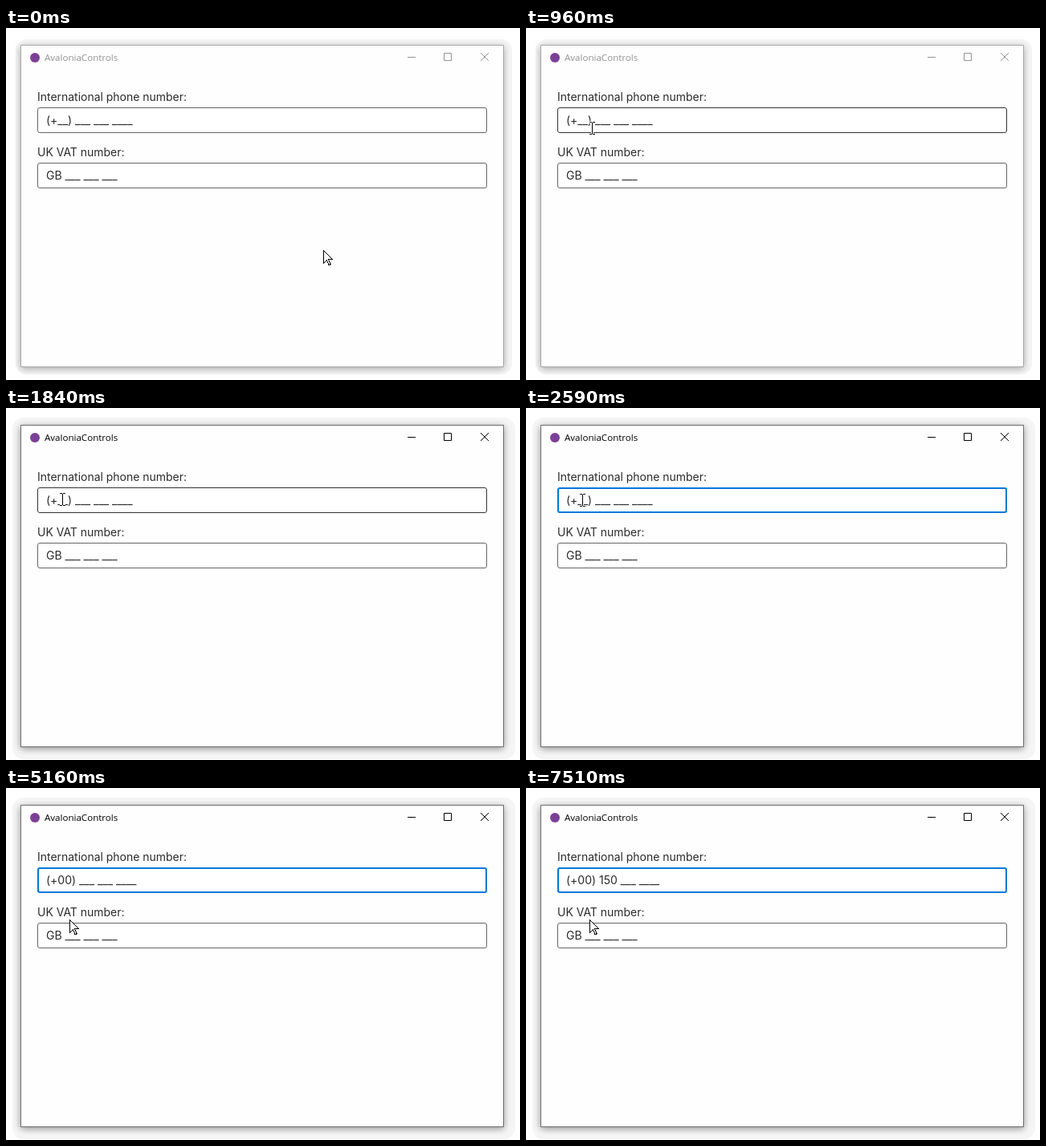
Animation, 640 px wide and 439 px high, one loop 8 s. Source, as an HTML page:

```html
<!DOCTYPE html>
<html lang="en">
<head>
<meta charset="utf-8">
<title>Masked input</title>
<style>
  html, body { margin: 0; width: 100%; height: 100%; overflow: hidden; background: #fff; }
  svg { display: block; }
  text { font: 14px Inter, sans-serif; letter-spacing: -.02px; fill: #2b2b2b; white-space: pre; }
  .title { font: 11.6px "Open Sans", sans-serif; }
  .line { fill: none; }
</style>
</head>
<body>
<svg width="640" height="439" viewBox="0 0 640 439">
  <defs>
    <filter id="blur" x="-10%" y="-10%" width="120%" height="120%">
      <feGaussianBlur stdDeviation="4.5"/>
    </filter>
  </defs>

  <rect id="halo" rx="14" fill="#f5f5f5"/>
  <rect id="shadow" x="18" y="23" width="602" height="402" rx="3" filter="url(#blur)"/>
  <rect id="frame" x="18.5" y="21.5" width="601" height="401" fill="#fefefe"/>

  <circle cx="36" cy="37" r="6" fill="#7b3f98"/>
  <text id="title" class="title" x="48" y="41">AvaloniaControls</text>
  <path id="buttons" class="line" d="M500 36.5h10M545.5 31.5h9v9h-9zM591 31l10 10M601 31l-10 10"/>

  <text x="39" y="91">International phone number:</text>
  <rect id="phoneBox" fill="#fff"/>
  <text id="phone" x="50" y="120"></text>
  <rect id="caret" y="106" width="1" height="17"/>

  <text x="39" y="160">UK VAT number:</text>
  <rect id="vatBox" fill="#fff"/>
  <text x="50" y="189">GB ___ ___ ___</text>

  <path id="arrow" fill="#fff" stroke="#000" shape-rendering="crispEdges"
    d="M.5 .5V16.5L4.5 12.5 7 18.5H8.5L9 17.5 6.5 11.5H11.5Z"/>
  <g id="beam" class="line">
    <path d="M-3 -7.5H4M.5 -7.5V7.5M-3 7.5H4" stroke="#fff" stroke-width="3"/>
    <path d="M-3 -7.5H0M1 -7.5H4M.5 -7V7M-3 7.5H0M1 7.5H4" stroke="#000"/>
  </g>
</svg>
<script>
const LOOP = 8000, STEP = 57.5, MOVE = 440, ACTIVATE = 1840, FOCUS = 1900;
const BLINK = 500, BLINK_START = 1600;
const PHONE_Y = 99, VAT_Y = 168, TEXT_X = 50;
const mask = "(+__) ___ ___ ____", digits = "00150";
const keyTimes = [4210, 4640, 6300, 6450, 7010];

// Pointer waypoints: approach, enter the field, settle, wait, leave
const path = [
  { t: 382, x: 395, y: 277 }, { t: 670, x: 160, y: 207 },
  { t: 957, x: 82, y: 125 }, { t: 1475, x: 70, y: 114 },
  { t: 2560, x: 70, y: 114 }, { t: 2990, x: 79, y: 164 }
];

const $ = id => document.getElementById(id);
const set = (id, attrs) => {
  for (const k in attrs) $(id).setAttribute(k, attrs[k]);
};
const show = (id, on) => set(id, { visibility: on ? "visible" : "hidden" });

// The pointer is sampled at a fixed rate and snaps to whole pixels
function pointer(t) {
  const q = t < MOVE ? 0 : MOVE + Math.floor((t - MOVE) / STEP) * STEP;
  const i = path.findIndex(p => p.t > q);
  if (i === 0) return path[0];
  if (i < 0) return path[path.length - 1];
  const a = path[i - 1], b = path[i], k = (q - a.t) / (b.t - a.t);
  const mix = n => Math.round(a[n] + (b[n] - a[n]) * k);
  return { x: mix("x"), y: mix("y") };
}

function drawBox(id, y, hover, focus) {
  const w = focus ? 2 : 1;
  set(id, {
    x: 39 + w / 2, y: y + w / 2, width: 560 - w, height: 32 - w, rx: 3 - w / 2,
    stroke: focus ? "#0078d7" : hover ? "#333" : "#666", "stroke-width": w
  });
}

function drawWindow(active) {
  const inset = active ? 0 : 4, ink = active ? "#000" : "#929292";
  set("halo", { x: 8 + inset, y: 12 + inset / 2, width: 626 - 2 * inset, height: 426 - 2 * inset });
  set("shadow", { opacity: active ? 0.42 : 0.33 });
  set("frame", { stroke: active ? "#707070" : "#aaa" });
  set("title", { style: `fill:${ink}` });
  set("buttons", { stroke: ink });
}

// Each key press fills the next blank and restarts the caret's blinking
function drawInput(t) {
  const typed = keyTimes.filter(k => k <= t).length;
  let n = 0;
  const value = mask.replace(/_/g, c => n < typed ? digits[n++] : c);
  $("phone").textContent = value;

  const since = t - (typed ? keyTimes[typed - 1] : BLINK_START);
  const width = $("phone").getSubStringLength(0, value.indexOf("_"));
  set("caret", { x: TEXT_X + Math.round(width) });
  show("caret", t >= FOCUS && Math.floor(since / BLINK) % 2 === 0);
}

function render(t) {
  drawWindow(t >= ACTIVATE);

  const { x, y } = pointer(t);
  const over = top => x >= 39 && x < 599 && y >= top && y < top + 32;
  const onPhone = over(PHONE_Y), onVat = over(VAT_Y), beam = onPhone || onVat;
  drawBox("phoneBox", PHONE_Y, onPhone, t >= FOCUS);
  drawBox("vatBox", VAT_Y, onVat, false);
  drawInput(t);

  for (const id of ["arrow", "beam"]) {
    set(id, { transform: `translate(${x} ${y})` });
    show(id, beam === (id === "beam"));
  }
}

const start = performance.now();
function tick() {
  render((performance.now() - start) % LOOP);
  requestAnimationFrame(tick);
}
tick();
</script>
</body>
</html>
```
